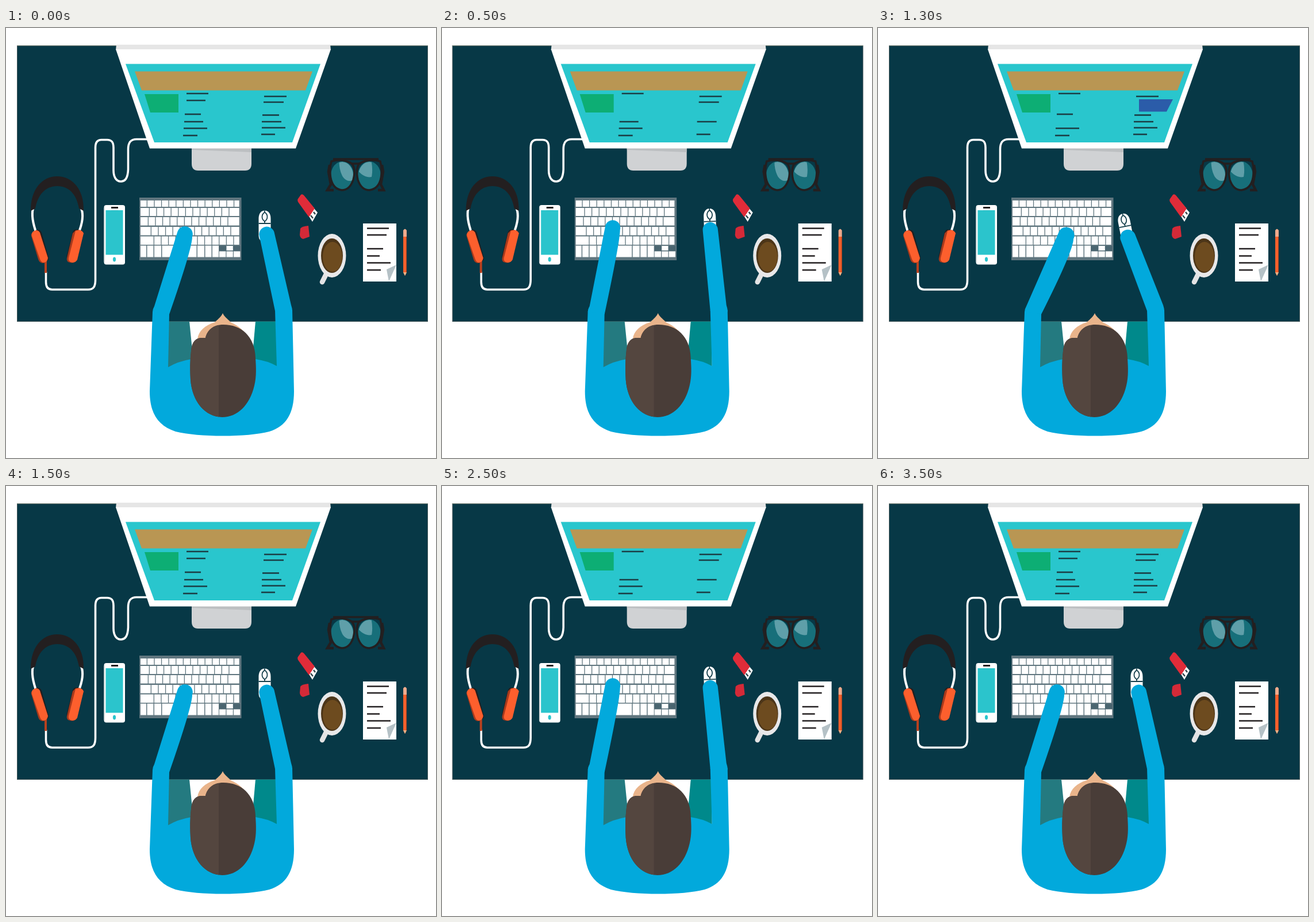
Animation, 748 px wide and 748 px high, one loop 4 s. Source, as an HTML page:

```html
<!DOCTYPE html>
<html lang="en">
<head>
<meta charset="utf-8">
<title>Desk from above</title>
<style>
  html, body { margin: 0; width: 100%; height: 100%; overflow: hidden; background: #fff; }
  svg { display: block; width: 100%; height: 100%; }
</style>
</head>
<body>
<svg viewBox="0 0 748 748">
  <defs>
    <clipPath id="hairClip"><rect x="300" y="500" width="70" height="200"/></clipPath>
    <clipPath id="lensClip"><ellipse cx="585" cy="257" rx="19" ry="24"/><ellipse cx="632" cy="257" rx="19" ry="24"/></clipPath>
    <path id="hair" d="M322 562C323 546 330 539 341 539H347C350 526 360 516 378 516C409 516 433 536 434 574C435 590 436 606 432 622C424 656 403 677 376 677C346 676 324 650 321 612C320 596 320 578 322 562Z"/>
  </defs>
  <g id="scene">
    <rect x="19.500" y="31" width="714" height="479.500" fill="#073846" stroke="#46585a"/>
    <path d="M19 30.500H734" stroke="#8f9a90"/>

    <!-- monitor -->
    <path d="M323 208H427V236Q427 248 416 248H334Q323 248 323 236Z" fill="#d0d2d4"/>
    <path d="M323 208H427V216L323 212Z" fill="#bcbfc1"/>
    <path d="M192 29H564L565 38H191Z" fill="#e6e6e6"/>
    <path d="M191 37H565L504 209.500H250Z" fill="#fff"/>
    <path d="M208 62.500H547L498 199H258Z" fill="#29c6cd"/>
    <path d="M224 75.500H533L521 108.500H236Z" fill="#b99653"/>
    <path d="M241 115H300V147H251Z" fill="#0dae74"/>
    <path id="panel" d="M454 124H513L502 145.500H454Z" fill="#2b5ca9"/>
    <g id="lines" stroke="#1b3d44" stroke-width="2.600"/>

    <!-- cable and headphones -->
    <path d="M248 193.500H227C216 193.500 212.500 200 212.500 211V246C212 260 208 267 200 267C191 267 187 258 187 248V208C187 199 184 194.500 176 194.500H166C159 194.500 155.500 199 155.500 208V438C155.500 450 152 455 143 455H80C72 455 69.500 450 69.500 442V424" fill="none" stroke="#fff" stroke-width="3.600"/>
    <path d="M69 404V426" stroke="#b8411f" stroke-width="4"/>
    <path d="M47 314Q43 330 53 357M131 314Q137 330 126 357" fill="none" stroke="#fff" stroke-width="4"/>
    <path d="M43 318C43 280 63 258 89 258C115 258 136 280 135 318L127 314C123 290 110 275 89 275C68 275 55 291 51 314Z" fill="#231f20"/>
    <path d="M51 352Q59 349 62 356L74 399Q75 405 69 406L62 390Z" fill="#231f20"/>
    <path d="M127 352Q119 348 116 355L106 395Q104 402 110 405L118 390Z" fill="#231f20"/>
    <path d="M46 356Q53 349 57 356L72 402Q71 409 64 409Q58 409 56 402L44 362Q43 358 46 356Z" fill="#a83a1c"/>
    <path d="M47 354Q55 349 59 356L73 400Q72 407 66 408Q61 408 59 402L45 362Q44 357 47 354Z" fill="#fd5f2d"/>
    <path d="M121 352Q131 349 135 357L122 404Q118 411 108 407Q105 404 106 400L116 357Z" fill="#a83a1c"/>
    <path d="M121 353Q131 349 135 357L124 403Q120 410 112 407Q108 405 109 400Z" fill="#fd5f2d"/>

    <!-- phone -->
    <rect x="170.500" y="308" width="36.500" height="103.500" rx="4" fill="#fff"/>
    <path d="M171 313V407" stroke="#ccd3d5" stroke-width="1.500"/>
    <rect x="173.500" y="317" width="30" height="77.500" fill="#2bc4cc"/>
    <path d="M183 312.500H195" stroke="#231f20" stroke-width="3"/>
    <ellipse cx="188.500" cy="402.500" rx="2.600" ry="4" fill="#2bc4cc"/>

    <rect x="232" y="295" width="177.500" height="109" fill="#60767f"/>
    <g id="keys" fill="#fff"/>

    <!-- glasses -->
    <g fill="#176f7a">
      <ellipse cx="585" cy="257" rx="20" ry="25"/>
      <ellipse cx="632" cy="257" rx="20" ry="25"/>
    </g>
    <g clip-path="url(#lensClip)" fill="#5f9fa9">
      <path d="M580 225H606V264Q594 270 586 259Q578 245 580 225ZM609 225H634Q639 244 636 259Q622 262 609 244Z"/>
    </g>
    <g fill="none" stroke="#231f20" stroke-width="3.500">
      <path d="M566 232Q585 226 602 236Q609 246 604 264Q598 282 584 282Q569 280 565 262Q562 246 566 232ZM651 232Q632 226 614 236Q608 246 612 264Q618 282 632 282Q648 280 652 262Q655 246 651 232Z"/>
      <path d="M569 228H648M600 236H617"/>
      <path d="M563 238L561 250L565 272L559 282H570M654 238L656 250L652 272L657 282H647" stroke-width="4.500"/>
    </g>

    <!-- memory stick -->
    <path d="M526 326L535 313L542 321L533 337Z" fill="#fff"/>
    <path d="M530 326L534 331M535 320L538 324" stroke="#34464c" stroke-width="2.500"/>
    <path d="M513 290Q516 288 519 292L537 314L527 329L509 304Q506 300 508 297Z" fill="#e02c39"/>
    <path d="M512 349Q514 345 526 344L528 363L517 367Q512 366 511 360Z" fill="#d42a38"/>

    <!-- mug -->
    <path d="M560 422L550 442" stroke="#e3e3e4" stroke-width="8.500" stroke-linecap="round"/>
    <ellipse cx="567" cy="396" rx="24.500" ry="38" fill="#e8e8e9"/>
    <ellipse cx="567" cy="396" rx="19" ry="30" fill="#4c3518"/>
    <ellipse cx="568" cy="398" rx="17" ry="26" fill="#6d4b1f"/>

    <!-- paper and pencil -->
    <rect x="621" y="340" width="58" height="101" fill="#fff"/>
    <path d="M628 348.500H666M628 360H662M628 384H656M628 396.500H650M628 408.500H669M628 421H652" stroke="#231f20" stroke-width="2.400"/>
    <path d="M662 420L679 412L666 441Z" fill="#b5c1c6"/>
    <path d="M691 425V363H697V425L694 431Z" fill="#f4602c"/>
    <path d="M691 363V352Q694 347 697 352V363Z" fill="#efaa8c"/>
    <path d="M691 425H697L694 431Z" fill="#e9b48b"/>
    <path d="M696.500 363V425" stroke="#b7431f"/>

    <g id="mouse">
      <path d="M-10.500 14C-10.500 5 -6 0 0 0S10.500 5 10.500 14V44Q10.500 54 0 54T-10.500 44Z" fill="#fff"/>
      <path d="M-10.500 22.500H10.500M0 0V4M0 18V22M0 3Q-4.500 6 -4.500 11T0 19Q4.500 16 4.500 11T0 3" fill="none" stroke="#17414d" stroke-width="1.800"/>
    </g>

    <!-- person -->
    <path d="M283 510.500H319L326 580L281 592Z" fill="#247a80"/>
    <path d="M434 510.500H471V590L428 578Z" fill="#00898b"/>
    <g fill="#02a9dc">
      <path id="armL"/>
      <path id="armR"/>
      <path d="M255 493L250 632C250 671 265 692 295 702C335 712 420 712 458 702C487 693 501 671 501 632L498 490L468 491L471 588Q455 579 434 576H322Q299 580 282 590L284 497Z"/>
    </g>
    <path d="M377 496C380 503 387 507 391 512C405 518 417 528 421 541H333C335 527 346 517 363 512C368 507 374 503 377 496Z" fill="#e9b48b"/>
    <use href="#hair" fill="#493d38"/>
    <use href="#hair" fill="#54463f" clip-path="url(#hairClip)"/>
  </g>
</svg>
<script>
const $ = id => document.getElementById(id);

function add(parent, tag, attrs) {
  const el = document.createElementNS('http://www.w3.org/2000/svg', tag);
  for (const k in attrs) el.setAttribute(k, attrs[k]);
  parent.appendChild(el);
  return el;
}

// Screen text: x start, x end, y, poses in which the line shows
const lines = [
  [314, 352, 114, 'ABC'], [314, 347, 126, 'A'], [311, 339, 150, 'AC'],
  [310, 343, 163, 'AB'], [309, 350, 174.5, 'ABC'], [308, 333, 187, 'ABC'],
  [449, 488, 119, 'ABC'], [448, 483, 129, 'AB'], [446, 475, 151.5, 'AC'],
  [445, 479, 163, 'ABC'], [445, 486, 173.5, 'AC'], [444, 468, 185, 'ABC']
].map(([x1, x2, y, on]) => ({ on, el: add($('lines'), 'line', { x1, x2, y1: y, y2: y }) }));

function key(x, y, w, h, fill = '#fff') {
  add($('keys'), 'rect', { x, y, width: w, height: h, fill });
}

// Key rows: y, height, width of the first key
[[300, 11, 12], [313, 14, 16], [329, 14.5, 14], [346, 14.5, 19], [362.5, 14.5, 24]]
  .forEach(([y, h, first]) => {
    let x = 234, w = first;
    while (x < 407) {
      if (407 - x - w < 8) w = 407 - x;
      key(x, y, w - 1.3, h);
      x += w;
      w = 12.6;
    }
  });
[[234, 10], [245.5, 11], [258, 12], [271.5, 60], [333, 12], [346.5, 11], [359, 11]]
  .forEach(([x, w]) => key(x, 378.5, w, 20));
// Arrow keys
key(371, 379, 36.5, 9, '#4a6570');
[371, 383.5, 396].forEach(x => key(x, 388.5, 11.3, 10));
key(383.5, 379, 11.3, 8);

// Each hand: the two ends of the wrist arc
const poses = {
  A: { shift: 0, left: [298.5, 354, 324, 363], right: [441, 363, 466.5, 355], mouse: [450, 317.5, 0] },
  B: { shift: -1.3, left: [285.5, 344, 311, 351], right: [455, 353, 481, 349], mouse: [466.5, 314, -2] },
  C: { shift: 0, left: [315, 354, 340, 367], right: [422.5, 370, 447, 358.5], mouse: [425.5, 323, -11] }
};
const steps = [[0, 'A'], [500, 'B'], [1000, 'C'], [1500, 'A'], [2500, 'B'], [3000, 'C'], [3500, 'A']];
const LOOP = 4000;
let shown;

const wrist = ([x1, y1, x2, y2]) => `L${x1} ${y1}A13 13 0 0 1 ${x2} ${y2}`;

function show(name) {
  if (name === shown) return;
  shown = name;
  const p = poses[name], [mx, my, turn] = p.mouse, [, , lx, ly] = p.left;
  $('scene').setAttribute('transform', `translate(${p.shift})`);
  $('armL').setAttribute('d', `M255 494Q255 489 258 484${wrist(p.left)}Q${lx} ${ly + 20} 284 498Z`);
  $('armR').setAttribute('d', `M468 492${wrist(p.right)}L496 482Q498 487 498 494Z`);
  $('mouse').setAttribute('transform', `translate(${mx} ${my}) rotate(${turn})`);
  $('panel').style.display = name === 'C' ? '' : 'none';
  lines.forEach(l => { l.el.style.display = l.on.includes(name) ? '' : 'none'; });
}

const start = performance.now();
function tick() {
  const t = (performance.now() - start) % LOOP;
  show(steps.filter(s => s[0] <= t).pop()[1]);
  requestAnimationFrame(tick);
}
tick();
</script>
</body>
</html>
```
